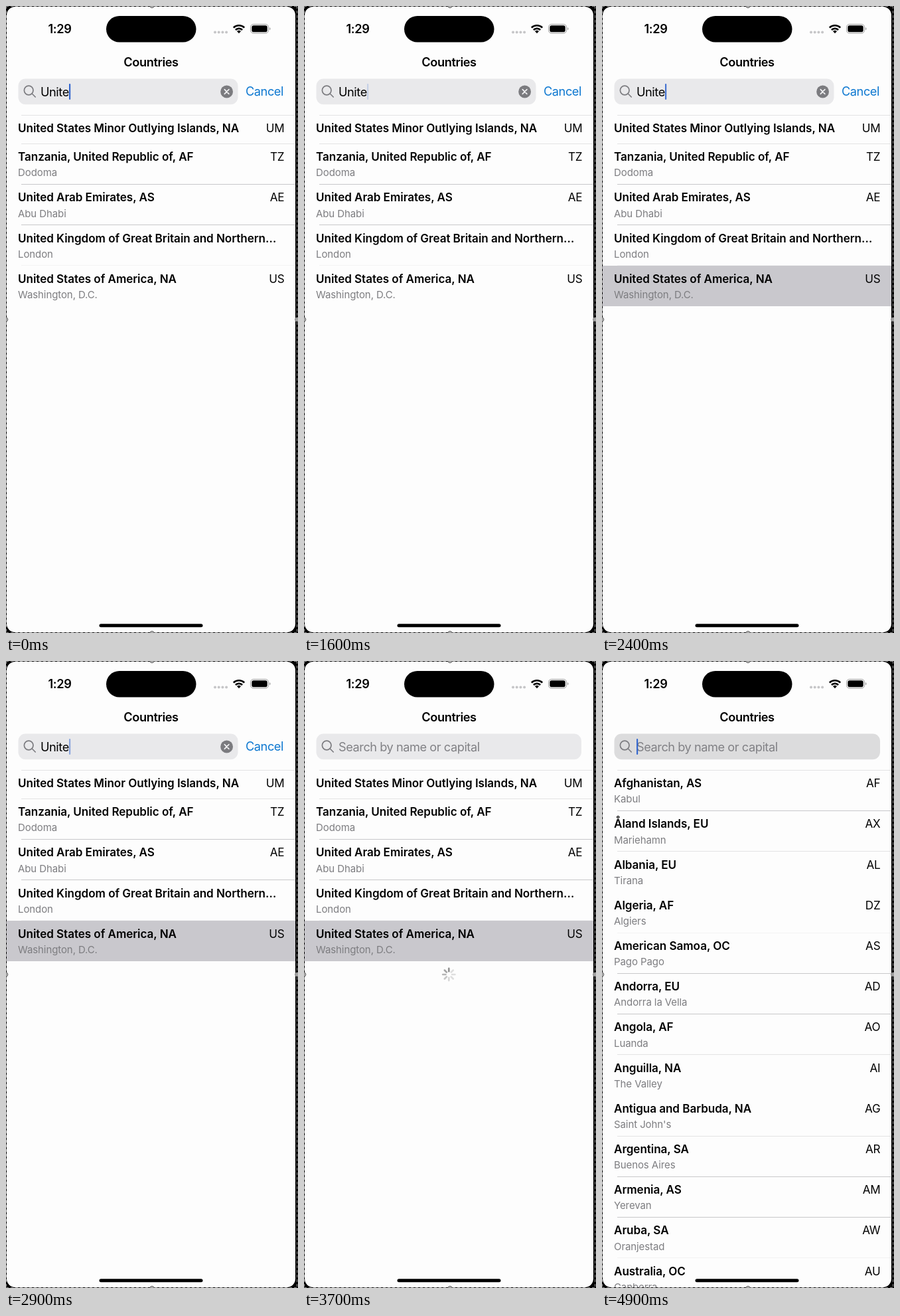
Recreate the animation shown at these times as an HTML page. Size 440 px wide and 944 px high, loop 5000 ms.

```html
<!DOCTYPE html>
<html lang="en">
<head>
<meta charset="utf-8">
<title>Countries</title>
<style>
html, body { margin: 0; width: 100%; height: 100%; overflow: hidden; background: #000; }
svg { display: block; width: 440px; height: 944px; }
text { font-family: Inter, Roboto, "Liberation Sans", sans-serif; font-optical-sizing: none; fill: #000; }
.head { font-size: 18.2px; font-weight: 600; letter-spacing: -.022em; text-anchor: middle; }
.field { font-size: 18.2px; letter-spacing: -.025em; }
.name { font-size: 17.1px; font-weight: 600; letter-spacing: -.0035em; }
.code { font-size: 17.1px; letter-spacing: -.014em; text-anchor: end; }
.sub { font-size: 15px; letter-spacing: -.006em; fill: #7d7d80; }
</style>
</head>
<body>
<svg viewBox="0 0 440 944">
  <defs><clipPath id="screen"><rect x="1" y="1" width="435" height="942" rx="13"/></clipPath></defs>
  <rect width="440" height="944" fill="#000"/>
  <g clip-path="url(#screen)">
    <rect width="440" height="944" fill="#fdfdfd"/>

    <text class="head" x="81" y="41">1:29</text>
    <rect x="151" y="15" width="135.5" height="39.5" rx="19.75"/>
    <g fill="#c6c6c8">
      <circle cx="315" cy="39.5" r="2"/><circle cx="320.7" cy="39.5" r="2"/>
      <circle cx="326.4" cy="39.5" r="2"/><circle cx="332.1" cy="39.5" r="2"/>
    </g>
    <g fill="none" stroke="#000" stroke-width="2.6">
      <path d="M342.8 32.6a11.6 11.6 0 0 1 16.4 0"/>
      <path d="M345.9 36a7.2 7.2 0 0 1 10.2 0"/>
    </g>
    <path d="M351 41.2l-3-3.1a4.3 4.3 0 0 1 6 0z"/>
    <rect x="368.5" y="27.5" width="27" height="13.5" rx="4.3" fill="none" stroke="#9c9c9c"/>
    <rect x="370.3" y="29.3" width="23.4" height="9.9" rx="2.8"/>
    <path d="M397 32a2.6 2.6 0 0 1 0 4.6z" fill="#9c9c9c"/>

    <text class="head" x="218.5" y="91">Countries</text>

    <rect id="box" x="18.5" y="109.5" width="331" height="38.7" rx="11"/>
    <g fill="none" stroke="#7c7c80" stroke-width="1.7" stroke-linecap="round">
      <circle cx="34.2" cy="127" r="6.8"/><path d="M39.2 132l5 5"/>
    </g>
    <text id="query" class="field" x="52" y="136">Unite</text>
    <text id="hint" class="field" x="52" y="136" style="fill:#818185">Search by name or capital</text>
    <rect id="caret" y="117" width="2.2" height="24" rx="1" fill="#3568cf"/>
    <g id="clear">
      <circle cx="332.6" cy="129" r="9.4" fill="#7b7b7f"/>
      <path d="M329.3 125.7l6.6 6.6m0-6.6l-6.6 6.6" stroke="#f2f2f4" stroke-width="1.7" stroke-linecap="round"/>
    </g>
    <text id="cancel" class="field" x="361" y="135" style="fill:#0c77d0">Cancel</text>

    <g id="found"></g>
    <g id="all"></g>
    <g id="spinner" stroke-width="2.7" stroke-linecap="round"></g>
    <rect x="140.5" y="930.3" width="156" height="5" rx="2.5"/>
  </g>

  <g fill="none" stroke="#8a8a8a" stroke-dasharray="4 3">
    <path d="M0 .5H440M0 943.5H440M.5 0V944M438.5 0V944"/>
  </g>
  <g fill="#a3a3a3" stroke="#6e6e6e" stroke-width=".8">
    <circle cx="0" cy="472" r="3"/><circle cx="438.8" cy="472" r="3.2"/>
    <circle cx="220" cy="0" r="3"/><circle cx="220" cy="944" r="3"/>
  </g>
</svg>
<script>
const NS = 'http://www.w3.org/2000/svg';
const $ = id => document.getElementById(id);

function add(parent, tag, attrs, text) {
  const el = document.createElementNS(NS, tag);
  for (const k in attrs) el.setAttribute(k, attrs[k]);
  if (text) el.textContent = text;
  parent.appendChild(el);
  return el;
}

// Separator strength: 0 hidden, 1 faint, 2 light, 3 full
const lineColor = ['#fdfdfd', '#f3f3f3', '#e3e3e4', '#c8c8ca'];

// Each row: name|code|capital|strength of the line above
function buildList(group, rows) {
  let top = 164.4;
  for (const row of rows) {
    const [name, code, capital, line] = row.split('|');
    add(group, 'rect', { x: 23, y: Math.floor(top), width: 412.5, height: 1, fill: lineColor[line] });
    add(group, 'text', { class: 'name', x: 18, y: top + 25.8 }, name);
    if (code) add(group, 'text', { class: 'code', x: 419.4, y: top + 25.8 }, code);
    if (capital) add(group, 'text', { class: 'sub', x: 18, y: top + 49 }, capital);
    top += capital ? 61.2 : 42.9;
  }
}

buildList($('found'), [
  'United States Minor Outlying Islands, NA|UM||2',
  'Tanzania, United Republic of, AF|TZ|Dodoma|2',
  'United Arab Emirates, AS|AE|Abu Dhabi|3',
  'United Kingdom of Great Britain and Northern…||London|3',
  'United States of America, NA|US|Washington, D.C.|1'
]);

// The highlight lies over the last separator and under that row's text
const picked = add($('found'), 'rect', { x: 0, y: 391, width: 436, height: 61, fill: '#c9c8cd' });
$('found').querySelector('rect:nth-last-of-type(2)').after(picked);

buildList($('all'), [
  'Afghanistan, AS|AF|Kabul|2',
  'Åland Islands, EU|AX|Mariehamn|3',
  'Albania, EU|AL|Tirana|2',
  'Algeria, AF|DZ|Algiers|0',
  'American Samoa, OC|AS|Pago Pago|1',
  'Andorra, EU|AD|Andorra la Vella|3',
  'Angola, AF|AO|Luanda|3',
  'Anguilla, NA|AI|The Valley|2',
  'Antigua and Barbuda, NA|AG|Saint John\'s|0',
  'Argentina, SA|AR|Buenos Aires|2',
  'Armenia, AS|AM|Yerevan|3',
  'Aruba, SA|AW|Oranjestad|3',
  'Australia, OC|AU|Canberra|1'
]);

const spokes = Array.from({ length: 8 }, (_, i) =>
  add($('spinner'), 'path', { d: 'M218.3 467.2V462.9', transform: `rotate(${i * 45} 218.3 472)` }));

const LOOP = 5000, STEP = 100;
const PICK = 2400, PRESS = 3200, CANCEL = 3500, RELOAD = 3800, TOUCH = 4700;
const blink = [1, 1, 1, 1, .9, .5, .2, 0, 0, .5];

const show = (el, on) => el.setAttribute('visibility', on ? 'visible' : 'hidden');

function draw(now) {
  const t = Math.floor(now % LOOP / STEP) * STEP;
  const searching = t < CANCEL;
  const out = Math.min(1, Math.max(0, (t - CANCEL + STEP) / 400));
  const grow = 1 - (1 - out) ** 3;

  const shade = t < TOUCH ? '#e9e9eb' : t === TOUCH ? '#e2e2e3' : '#dcdcdd';
  $('box').setAttribute('fill', shade);
  $('box').setAttribute('width', 331 + 69.5 * grow);

  show($('query'), searching);
  show($('clear'), searching);
  show($('hint'), !searching);

  $('cancel').setAttribute('x', 361 + 75 * grow);
  $('cancel').setAttribute('opacity', t < PRESS ? 1 : .22 * (1 - grow));

  $('caret').setAttribute('x', searching ? 95 : 52);
  $('caret').setAttribute('opacity', searching ? blink[t % 1000 / STEP] : t >= TOUCH + 2 * STEP ? 1 : 0);

  show(picked, t >= PICK && t < RELOAD);
  show($('found'), t < RELOAD);
  show($('all'), t >= RELOAD);

  show($('spinner'), t >= RELOAD - 2 * STEP && t < RELOAD);
  const lead = (t - RELOAD + STEP) / STEP;
  spokes.forEach((s, i) => {
    const age = ((lead - i) % 8 + 8) % 8;
    s.setAttribute('stroke', `rgb(${Array(3).fill(Math.min(222, 148 + age * 17)).join()})`);
  });
}

let start;
function tick(now) {
  if (start === undefined) start = now;
  draw(now - start);
  requestAnimationFrame(tick);
}
draw(0);
requestAnimationFrame(tick);
</script>
</body>
</html>
```
